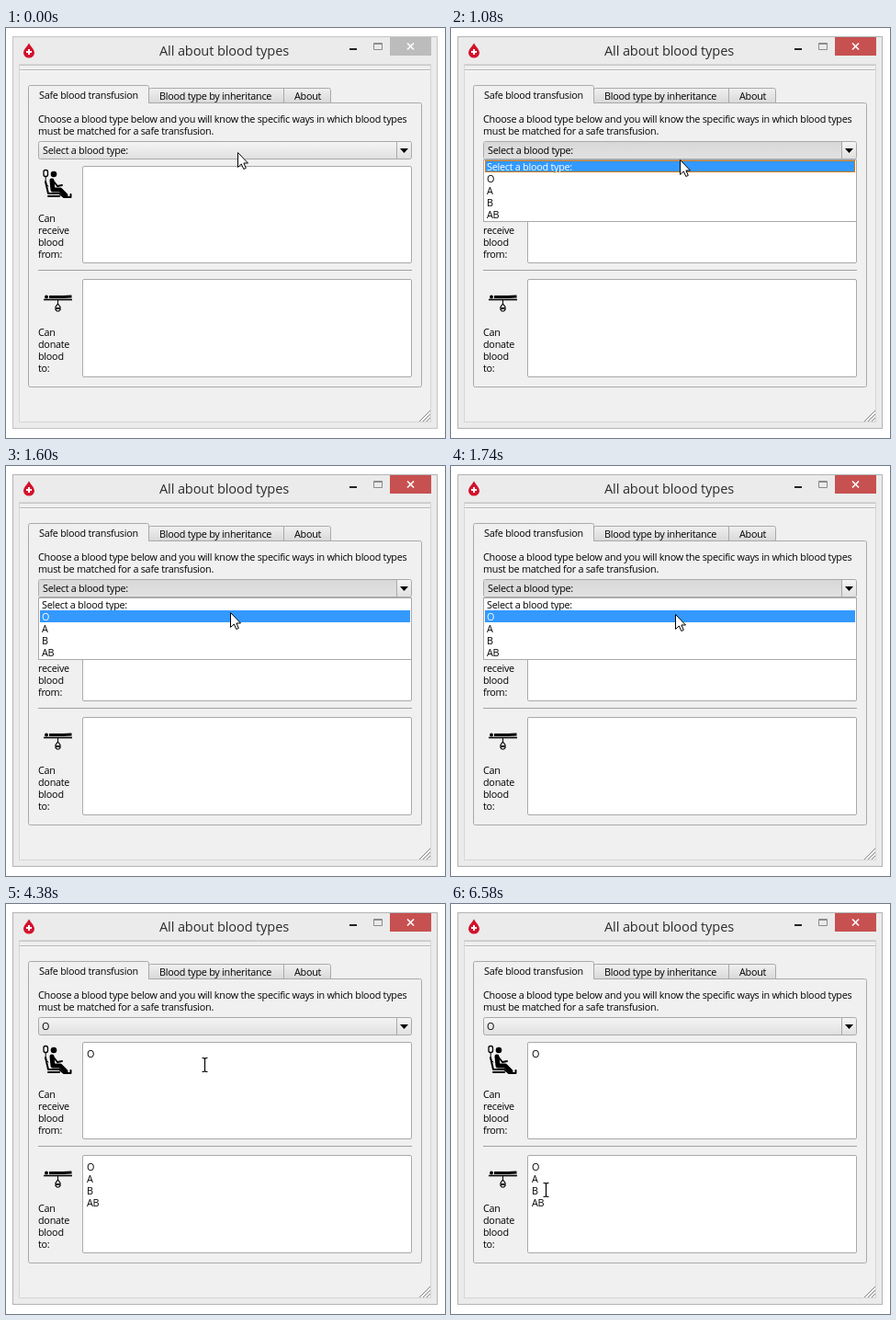
Animation of 478x446 px, one loop 8 s. Source, as an HTML page:

```html
<!DOCTYPE html>
<html lang="en">
<head>
<meta charset="utf-8">
<title>All about blood types</title>
<style>
  html, body { margin: 0; width: 100%; height: 100%; overflow: hidden; background: #fff; }
  svg { display: block; width: 478px; height: 446px; }
  text { font: 10.8px "Open Sans", "Noto Sans", sans-serif; letter-spacing: -.25px; fill: #000; white-space: pre; }
  .title { font-size: 14.6px; letter-spacing: -.13px; fill: #2c2c2c; }
  .light text, text.light { fill: #fff; }
  .edge { stroke: #a9a9a9; }
  .field { fill: #fff; stroke: #a9a9a9; }
</style>
</head>
<body>
<svg viewBox="0 0 478 446">
  <defs>
    <linearGradient id="tab" x2="0" y2="1"><stop stop-color="#f0f0f0"/><stop offset="1" stop-color="#d9d9d9"/></linearGradient>
    <linearGradient id="button" x2="0" y2="1"><stop stop-color="#f5f5f5"/><stop offset="1" stop-color="#e0e0e0"/></linearGradient>
    <linearGradient id="pressed" x2="0" y2="1"><stop stop-color="#d8d8d8"/><stop offset="1" stop-color="#e1e1e1"/></linearGradient>
  </defs>

  <!-- window frame -->
  <rect x="7.5" y="9.5" width="462" height="426" fill="#ebebeb" stroke="#c4c4c4"/>
  <rect id="frame" x="7.5" y="9.5" width="462" height="426" fill="none" stroke="#b3b3b3"/>
  <rect x="14.5" y="39.5" width="448" height="389" fill="#f0f0f0" stroke="#d6d6d6"/>
  <path d="M15 40.5H462" stroke="#c8c8c8"/>
  <path d="M15 45.5H462" stroke="#b6b6b6"/>
  <path d="M15 46.5H462" stroke="#fafafa"/>
  <path d="M25 16.5C27 20 31 23.500 31 27A6 5.500 0 0 1 19 27C19 23.500 23 20 25 16.500Z" fill="#d3122c"/>
  <path d="M22 26H28M25 23V29" stroke="#fff" stroke-width="2"/>
  <text class="title" x="167" y="30">All about blood types</text>
  <path d="M374 23H382" stroke="#222" stroke-width="2"/>
  <path d="M400.500 16.500H409.500V23.500H400.500ZM400 17.500H410" fill="none" stroke="#8b8b8b"/>
  <rect x="418" y="10" width="45" height="20" fill="#bcbcbc"/>
  <rect id="close" x="418" y="10" width="45" height="20" fill="#c75050"/>
  <path d="M437 16.500L444 23.500M444 16.500L437 23.500" stroke="#fff" stroke-width="1.7"/>
  <path d="M450 428L462 416M454 428L462 420M458 428L462 424" stroke="#858585"/>

  <!-- tabs -->
  <path d="M155.500 81.500V67.500Q155.500 65.500 157.500 65.500H351.500Q353.500 65.500 353.500 67.500V81.500Z" fill="url(#tab)" class="edge"/>
  <path d="M302.500 66V81" class="edge"/>
  <rect x="24.500" y="81.500" width="428" height="309" rx="2" fill="#f0f0f0" class="edge"/>
  <path d="M24.500 84V64.500Q24.500 62.500 26.500 62.500H153.500Q155.500 62.500 155.500 64.500V81.500" fill="#f0f0f0" class="edge"/>
  <path d="M25 81.500H155" stroke="#f0f0f0" stroke-width="2"/>
  <g id="labels"></g>

  <!-- selector and lists -->
  <rect x="35.500" y="123.500" width="406" height="19" rx="2" fill="url(#button)" class="edge"/>
  <path id="held" d="M36 124H425V142H36Z" fill="url(#pressed)"/>
  <path d="M425.500 124V142" class="edge"/>
  <path d="M429 131H438L433.500 136Z"/>
  <rect x="83.500" y="150.500" width="358" height="105" rx="1.500" class="field"/>
  <path d="M35 263.500H442" stroke="#a0a0a0"/>
  <rect x="83.500" y="273.500" width="358" height="106" rx="1.500" class="field"/>

  <!-- seated recipient -->
  <g fill="none" stroke="#000" stroke-linecap="round" stroke-linejoin="round">
    <rect x="41" y="154.500" width="4.500" height="7" rx="2" stroke-width="1.300"/>
    <path d="M43.200 162V169L46 172" stroke-width="1"/>
    <circle cx="52" cy="159" r="3.300" fill="#000" stroke="none"/>
    <path d="M50 166L51 176H59L65 182" stroke-width="5"/>
    <path d="M52 167L56 172L61 171" stroke-width="2"/>
    <path d="M43 167L46 180H58L63 184H70.500V181" stroke-width="2"/>
    <path d="M46 183H58" stroke-width="2"/>
  </g>
  <!-- lying donor -->
  <g fill="none" stroke="#000">
    <circle cx="44" cy="292.500" r="1.900" fill="#000" stroke="none"/>
    <path d="M47 292.500H62L71.500 292" stroke-width="3"/>
    <path d="M41 295.500H72" stroke-width="1.600"/>
    <path d="M56.500 296V302"/>
    <path d="M56.500 300L59 303.500V306.500L57.500 308H55.500L54 306.500V303.500Z" fill="#fff" stroke-width="1.200"/>
    <path d="M54.500 305H58.500" stroke-width="2"/>
  </g>

  <g id="prompt"></g>
  <g id="result"></g>
  <g id="popup">
    <rect x="35.500" y="143.500" width="406" height="67" fill="#fff" class="edge"/>
    <g id="items"></g>
    <g id="firstRow">
      <rect x="37.500" y="144.500" width="402" height="12" fill="#39f" stroke="#d07a20"/>
      <text class="light" x="39" y="155">Select a blood type:</text>
    </g>
    <g id="secondRow">
      <rect x="37" y="157" width="403" height="13" fill="#39f"/>
      <text class="light" x="39" y="168">O</text>
    </g>
  </g>

  <g id="arrow">
    <path d="M.5 .5V16.500L4.300 13L6.800 18.500L9.300 17.400L6.900 12H11.500Z" fill="#fff" stroke="#000"/>
  </g>
  <g id="beam" fill="none">
    <path d="M.5 .5H2.500L3.500 1.500L4.500 .5H6.500M3.500 1.500V14.500M.5 15.500H2.500L3.500 14.500L4.500 15.500H6.500" stroke="#000" stroke-width="1.200"/>
  </g>
</svg>
<script>
const DURATION = 8000;
const $ = id => document.getElementById(id);

function write(parent, x, y, lines, step = 13) {
  lines.forEach((line, i) => {
    const text = document.createElementNS("http://www.w3.org/2000/svg", "text");
    text.setAttribute("x", x);
    text.setAttribute("y", y + i * step);
    text.textContent = line;
    $(parent).append(text);
  });
}

write("labels", 36, 77, ["Safe blood transfusion"]);
write("labels", 167, 78, ["Blood type by inheritance"]);
write("labels", 314, 78, ["About"]);
write("labels", 35, 103, [
  "Choose a blood type below and you will know the specific ways in which blood types",
  "must be matched for a safe transfusion."
]);
write("labels", 35, 211, ["Can", "receive", "blood", "from:"]);
write("labels", 35, 335, ["Can", "donate", "blood", "to:"]);
write("prompt", 40, 137, ["Select a blood type:"]);
write("items", 39, 155, ["Select a blood type:", "O", "A", "B", "AB"]);
write("result", 39, 137, ["O"]);
write("result", 88, 167, ["O"]);
write("result", 88, 290, ["O", "A", "B", "AB"]);

// Holds each value until the next time in the table.
function hold(id, property, steps) {
  const frames = steps.map(([time, value]) => ({
    offset: time / DURATION, [property]: value, easing: "step-end"
  }));
  frames.push({ ...frames.at(-1), offset: 1 });
  $(id).animate(frames, { duration: DURATION, iterations: Infinity }).startTime = 0;
}

function show(id, from, to = DURATION) {
  const steps = [[0, from === 0 ? 1 : 0]];
  if (from > 0) steps.push([from, 1]);
  if (to < DURATION) steps.push([to, 0]);
  hold(id, "opacity", steps);
}

const move = (id, steps) =>
  hold(id, "transform", steps.map(([time, x, y]) => [time, `translate(${x}px, ${y}px)`]));

const OPEN = 500, HOVER = 1600, CHOOSE = 2020;
show("frame", OPEN);
show("close", OPEN);
show("held", OPEN, CHOOSE);
show("popup", OPEN, CHOOSE);
show("firstRow", OPEN, HOVER);
show("secondRow", HOVER, CHOOSE);
show("prompt", 0, CHOOSE);
show("result", CHOOSE);
show("arrow", 0, CHOOSE);
show("beam", CHOOSE);

move("arrow", [
  [0, 252, 135], [930, 252, 136], [1080, 249, 143], [1200, 245, 150],
  [1350, 245, 154], [1470, 245, 156], [1600, 244, 159], [1740, 244, 161]
]);
move("beam", [
  [0, 243, 154], [4380, 213, 167], [4530, 176, 164], [4660, 143, 160],
  [4800, 122, 162], [4920, 110, 164], [5070, 109, 164], [5190, 108, 164],
  [6030, 113, 190], [6150, 110, 243], [6280, 103, 287], [6430, 102, 301], [6580, 100, 303]
]);
</script>
</body>
</html>
```
